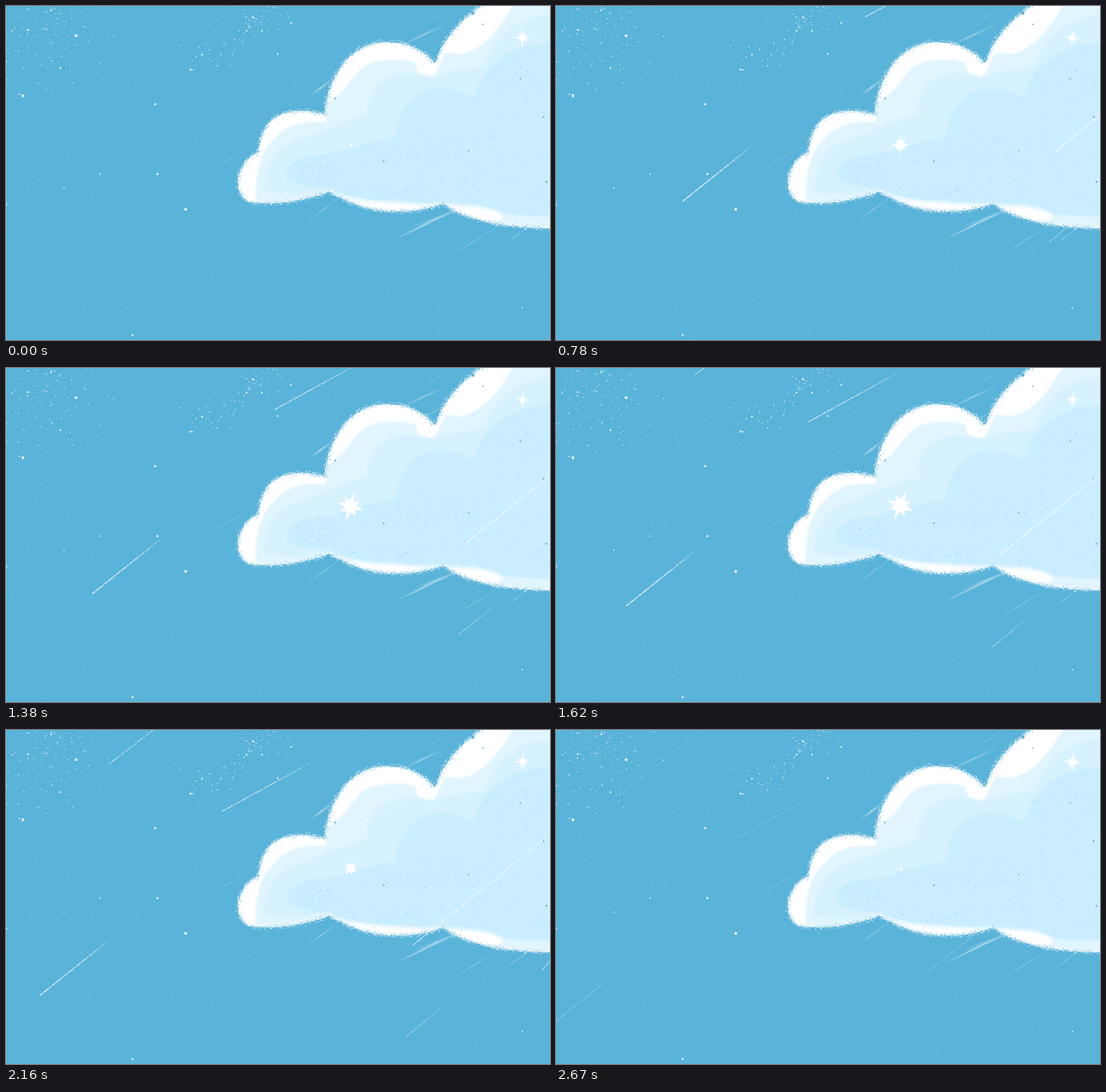
Animation, 769 px wide and 473 px high, one loop 2700 ms. Source, as an HTML page with a canvas:

```html
<!DOCTYPE html>
<html lang="en">
<head>
<meta charset="utf-8">
<title>Cloud and shooting stars</title>
<style>
html, body { margin: 0; width: 100%; height: 100%; overflow: hidden; background: #5ab3d9; }
canvas { display: block; }
</style>
</head>
<body>
<canvas id="stage" width="769" height="473"></canvas>
<script>
const W = 769, H = 473, LOOP = 2700, STEP = 30;
const SKY = '#5ab3d9', DEEP = '#caeeff';
const stage = document.getElementById('stage').getContext('2d');

let seed = 41;
const rnd = () => {
  seed = (seed * 1664525 + 1013904223) >>> 0;
  return seed / 4294967296;
};
const gauss = () => rnd() + rnd() + rnd() + rnd() - 2;

const OUTLINE = 'M674 -2C646 16 618 46 608 78Q605 83 602 77C590 63 570 51 535 51C490 52 455 95 451 154' +
  'C425 145 395 147 377 160C364 171 357 190 357 207C338 214 328 234 328 250C328 266 338 279 352 279' +
  'C385 281 425 276 456 263C480 276 510 291 545 291C572 292 596 288 618 280C640 298 690 314 774 315';
const LIGHT = 'M717 -2C700 30 670 67 640 68L623 66C614 72 612 96 600 101C588 103 580 95 579 80' +
  'C560 73 530 75 512 82C492 92 484 118 466 128L454 138L452 164C420 162 395 168 380 188' +
  'C362 203 352 230 353 277C395 280 425 275 456 263C480 276 510 290 545 290C575 291 596 287 618 280' +
  'C640 296 690 313 774 313V-2Z';
const MIDDLE = 'M774 12C725 12 690 45 676 84C650 92 625 90 605 101C580 92 545 92 527 109C512 122 510 140 511 154' +
  'C470 165 445 178 420 187C385 196 366 216 364 262C400 272 430 266 456 258L618 276L774 300Z';
const SHADE = 'M774 52C715 51 672 83 661 130C640 116 610 112 588 122C564 136 551 160 551 186' +
  'C510 190 475 208 440 211C412 212 396 224 396 239C398 253 428 257 456 258' +
  'C485 272 520 278 548 276C580 280 600 280 618 278C650 290 700 298 774 298Z';
const RIMS = [
  'M474 270C500 276 535 279 590 282L606 284C570 292 520 292 474 270Z',
  'M622 282C660 281 690 286 702 296C705 304 690 308 676 305C654 300 635 292 622 282Z'
];

function dot(c, x, y, r, color, alpha) {
  c.globalAlpha = alpha;
  c.fillStyle = color;
  c.beginPath();
  c.arc(x, y, r, 0, 7);
  c.fill();
  c.globalAlpha = 1;
}

function line(c, x1, y1, x2, y2, width, alpha) {
  const g = c.createLinearGradient(x1, y1, x2, y2);
  g.addColorStop(0, 'rgba(255,255,255,0)');
  g.addColorStop(.45, `rgba(255,255,255,${alpha})`);
  g.addColorStop(1, 'rgba(255,255,255,0)');
  c.strokeStyle = g;
  c.lineWidth = width;
  c.beginPath();
  c.moveTo(x1, y1);
  c.lineTo(x2, y2);
  c.stroke();
}

function shape(c, d, color, blur = 0) {
  c.filter = blur ? `blur(${blur}px)` : 'none';
  c.fillStyle = color;
  c.fill(new Path2D(d));
  c.filter = 'none';
}

function paintStars(c) {
  for (let i = 0; i < 430; i++)
    dot(c, rnd() * W, rnd() * H, .3 + rnd() * .4, '#fff', .15 + rnd() * .35);
  for (let i = 0; i < 190; i++)
    dot(c, 55 + gauss() * 75, Math.abs(gauss()) * 95, .35 + rnd() * .6, '#fff', .3 + rnd() * .6);
  for (let i = 0; i < 130; i++) {
    const k = rnd() ** 1.5;
    dot(c, 375 - k * 115 + gauss() * 36, 5 + k * 88 + gauss() * 16, .35 + rnd() * .6, '#fff', .35 + rnd() * .6);
  }
  const bright = [[24, 127, 2], [19, 125, 1], [99, 42, 1.9], [211, 139, 1.6], [254, 288, 2], [214, 238, 1.6],
    [133, 238, 1], [82, 258, 1], [0, 281, 1.5], [179, 466, 1.4], [261, 90, 1.5], [349, 16, 1.4],
    [384, 68, 1.2], [77, 88, 1.3], [31, 34, 1.2], [64, 6, 1.3], [403, 24, 1.2], [362, 35, 1.2],
    [340, 35, 1.3], [277, 69, 1.3], [0, 79, 1.2], [730, 427, 1]];
  for (const [x, y, r] of bright) dot(c, x, y, r, '#fff', .9);
}

function paintRays(c) {
  const rays = [[430, 127, 464, 102, 3, .4], [385, 128, 458, 86, 1, .18], [276, 239, 356, 195, 1, .28],
    [425, 306, 476, 268, 1.4, .35], [546, 332, 640, 287, 2, .45], [572, 315, 650, 284, 4, .28],
    [628, 354, 700, 309, 1.2, .3], [704, 339, 740, 312, 1.2, .35], [560, 55, 622, 26, 2.5, .32],
    [592, 26, 632, 0, 1, .3]];
  for (const r of rays) line(c, ...r);
}

// Chalky edge: white grains outside, sky-coloured grains inside.
function paintGrain(c) {
  const path = document.createElementNS('http://www.w3.org/2000/svg', 'path');
  path.setAttribute('d', OUTLINE);
  const length = path.getTotalLength();
  for (let s = 0; s < length; s += .55) {
    const p = path.getPointAtLength(s), q = path.getPointAtLength(s + 1);
    const nx = q.y - p.y, ny = p.x - q.x;
    const at = (d, r, color, a) => dot(c, p.x + nx * d, p.y + ny * d, r, color, a);
    at(gauss() * 2.8, .4 + rnd() * .5, '#fff', .8);
    at(gauss() * 2.8, .4 + rnd() * .4, SKY, .75);
    if (rnd() < .13) at((p.y < 250 ? -1 : 1) * 0 - Math.abs(gauss()) * 12, .4 + rnd() * .4, SKY, .55);
  }
}

function paintSpecks(c) {
  const patch = (n, x, y, w, h) => {
    for (let i = 0; i < n; i++)
      dot(c, x + gauss() * w, y + gauss() * h, .35 + rnd() * .45, SKY, .25 + rnd() * .45);
  };
  patch(85, 585, 207, 75, 22);
  patch(50, 430, 238, 32, 20);
  patch(40, 725, 100, 45, 35);
  patch(70, 675, 240, 90, 50);
  patch(45, 540, 266, 70, 12);
  for (const [x, y, r] of [[660, 10, 2.3], [764, 249, 1.3], [760, 157, 1.2], [534, 220, 1.2], [727, 103, 1.1],
    [465, 131, 1.2], [674, 26, 1], [654, 205, 1]]) dot(c, x, y, r, '#4a9cc4', .8);
}

function paintScene() {
  const canvas = document.createElement('canvas');
  canvas.width = W;
  canvas.height = H;
  const c = canvas.getContext('2d');
  c.fillStyle = SKY;
  c.fillRect(0, 0, W, H);
  paintStars(c);
  paintRays(c);
  shape(c, OUTLINE + 'V-2Z', '#fff');
  c.save();
  c.clip(new Path2D(OUTLINE + 'V-2Z'));
  shape(c, LIGHT, '#e1f5ff', 1);
  shape(c, MIDDLE, '#d7f2ff', 1.5);
  shape(c, SHADE, DEEP, 1.2);
  for (const d of RIMS) shape(c, d, '#fff', 2.5);
  c.restore();
  paintGrain(c);
  paintSpecks(c);
  return canvas;
}

// Head position at 2370 ms, trail offset, width, opacity.
const VX = -.095, VY = .072, REF = 2370;
const comets = [
  [28, 391, 95, -76, 1.6, .85],
  [286, 130, 124, -68, 1.4, .7],
  [125, 64, 150, -116, 1.2, .6],
  [555, 320, 260, -210, 1.5, .7],
  [546, 449, 50, -41, 1.1, .5],
  [738, 355, 38, -43, 1.3, .6],
  [482, 147, 95, -46, 1.2, .35],
  [685, 109, 110, -61, 1.2, .35]
];

function drawComet(t, [x, y, dx, dy, width, alpha]) {
  const hx = x + VX * (t - REF), hy = y + VY * (t - REF);
  const fade = Math.max(0, Math.min(1, t / 350, (2775 - t) / 400));
  const g = stage.createLinearGradient(hx, hy, hx + dx, hy + dy);
  g.addColorStop(0, '#fff');
  g.addColorStop(.6, 'rgba(255,255,255,.85)');
  g.addColorStop(1, 'rgba(255,255,255,.25)');
  stage.strokeStyle = g;
  stage.beginPath();
  stage.moveTo(hx, hy);
  stage.lineTo(hx + dx, hy + dy);
  stage.globalAlpha = alpha * fade * .6;
  stage.lineWidth = width * .75;
  stage.stroke();
  stage.globalAlpha = alpha * fade * .7;
  stage.lineWidth = width;
  stage.setLineDash([5, 2, 9, 1.5, 2, 3]);
  stage.stroke();
  stage.setLineDash([]);
  stage.globalAlpha = 1;
}

function track(t, steps) {
  let i = 1;
  while (i < steps.length - 1 && t > steps[i][0]) i++;
  const [t0, a] = steps[i - 1], [t1, b] = steps[i];
  return a + (b - a) * (t - t0) / (t1 - t0);
}

function sparkle(x, y, r, turn, rays, core) {
  const n = rays.length;
  stage.fillStyle = '#fff';
  stage.beginPath();
  for (let i = 0; i < n * 2; i++) {
    const a = turn - Math.PI / 2 + i * Math.PI / n;
    const d = r * (i % 2 ? core : rays[i / 2]);
    stage.lineTo(x + Math.cos(a) * d, y + Math.sin(a) * d);
  }
  stage.fill();
}

const BIG = [[0, 3], [400, 6.5], [780, 13.5], [1140, 18], [1450, 21], [1620, 21], [1920, 16.5], [2370, 7.5], [2700, 3]];
const scene = paintScene();

function draw(t) {
  stage.drawImage(scene, 0, 0);
  for (const comet of comets) drawComet(t, comet);
  const phase = t / LOOP * Math.PI * 2;
  const lift = Math.sin(phase / 2) * 2;
  sparkle(488 - lift * .7, 197 - track(t, [[0, 0], [1140, 0], [1800, 3], [2370, 0], [2700, 0]]),
    track(t, BIG), (t - 780) / LOOP * 1.3, [1, .75, .95, .8, 1, .7, .9, .8], .42);
  sparkle(730, 45, 12.7 + Math.cos(phase) * 1.8, .06 + Math.sin(phase) * .06,
    [1, .55, .85, .55, 1, .55, .95, .6], .3);
}

const start = performance.now();
function tick() {
  const t = (performance.now() - start) % LOOP;
  draw(Math.floor(t / STEP) * STEP);
  requestAnimationFrame(tick);
}
tick();
</script>
</body>
</html>
```
